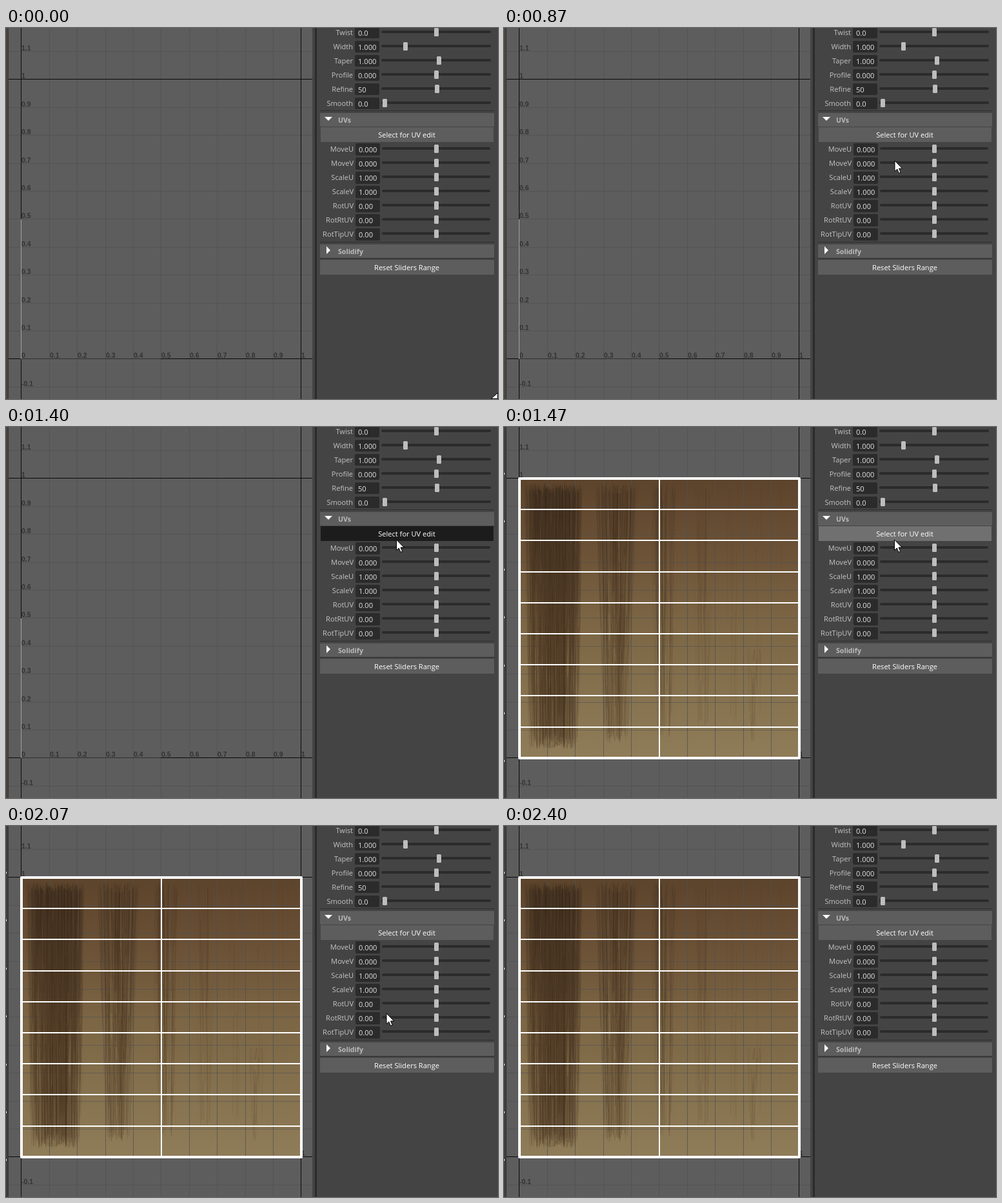
These frames come from a looping animation (763x576 px, 3190 ms). An HTML page with a canvas:

```html
<!DOCTYPE html>
<html lang="en">
<head>
<meta charset="utf-8">
<title>UV editor</title>
<style>
html, body { margin: 0; width: 100%; height: 100%; overflow: hidden; background: #444; }
canvas { display: block; }
</style>
</head>
<body>
<canvas id="stage" width="763" height="576"></canvas>
<script>
const W = 763, H = 576, LOOP = 3190, STEP = 200 / 3, UNIT = 43.4;
const FONT = '"Open Sans", "Noto Sans", sans-serif';
const PLAIN = '11.1px ' + FONT, BOLD = 'bold 10.6px ' + FONT;
const LABEL = 'bold 10.5px "Liberation Sans", Arial, sans-serif';
const ctx = document.getElementById('stage').getContext('2d');

function layer(draw) {
  const c = document.createElement('canvas');
  c.width = W;
  c.height = H;
  draw(c.getContext('2d'));
  return c;
}

function rect(g, x, y, w, h, color, r = 0) {
  g.fillStyle = color;
  g.beginPath();
  g.roundRect(x, y, w, h, r);
  g.fill();
}

function text(g, s, x, y, color, font, align = 'left') {
  g.font = font;
  g.textAlign = align;
  g.fillStyle = color;
  g.fillText(s, x, y);
}

// Filled SVG path placed at x, y, with an optional outline
function shape(g, d, x, y, fill, stroke) {
  const p = new Path2D(d);
  g.save();
  g.translate(x, y);
  g.fillStyle = fill;
  g.fill(p);
  if (stroke) {
    g.strokeStyle = stroke;
    g.stroke(p);
  }
  g.restore();
}

const lerp = (a, b, t) => a + (b - a) * t;
const gridX = i => Math.ceil(23 + i * UNIT - .01);
const gridY = i => Math.ceil(513 - i * UNIT - .01);

// UV view: grid, axes and labels
const view = layer(g => {
  rect(g, 0, 0, 482, H, '#444');
  rect(g, 4, 0, 471, H, '#5d5d5d');
  for (let i = -1; i <= 11; i++) {
    rect(g, 4, gridY(i), 471, 1, '#535353');
    if (i > 0 && i < 10) rect(g, gridX(i), 0, 1, H, '#535353');
  }
  for (const i of [0, 10]) {
    rect(g, gridX(i), 0, 1, H, '#0a0a0a');
    rect(g, 4, gridY(i), 471, 1, '#0a0a0a');
  }
  rect(g, 23, 513, 217, 1, '#303030');
  rect(g, 23, 297, 1, 217, '#a0a0a0');
  for (let i = -1; i <= 11; i++) {
    text(g, i / 10, 24, gridY(i) - 1, '#333', LABEL);
    if (i > 0 && i < 11) text(g, i / 10, gridX(i) + 1, 512, '#333', LABEL);
  }
  rect(g, 479, 0, 3, H, '#2b2b2b');
  rect(g, 0, 0, 3, H, '#4b443f');
  rect(g, 3, 0, 1, H, '#383838');
});

// Hair texture with the selected wireframe
const texture = layer(g => {
  let seed = 7;
  const rnd = () => (seed = seed * 16807 % 2147483647) / 2147483647;

  function shade(...colors) {
    const f = g.createLinearGradient(0, 80, 0, 514);
    colors.forEach((c, i) => f.addColorStop(i / (colors.length - 1), c));
    return f;
  }

  // Lock of hair centred on x, w wide at the top and w * taper at the bottom
  function lock(x, w, taper, y0, y1, count, alpha) {
    for (let i = 0; i < count; i++) {
      const u = rnd(), tone = rnd() * 36 - 14;
      const start = rnd() < .35 ? rnd() * .04 : rnd() * .8;
      const end = Math.min(start + .1 + rnd() * .6, 1 - rnd() * .05);
      const at = t => [x + (u - .5) * w * lerp(1, taper, t) + (rnd() - .5) * 3, lerp(y0, y1, t)];
      const rgb = (r, gr, b) => `rgb(${r + tone} ${gr + tone * .8} ${b + tone * .6})`;
      g.strokeStyle = shade(rgb(54, 39, 25), rgb(72, 52, 32), rgb(78, 58, 36));
      g.globalAlpha = alpha * Math.sqrt(Math.sin(Math.PI * u));
      g.lineWidth = .6 + rnd() * .7;
      g.beginPath();
      g.moveTo(...at(start));
      g.quadraticCurveTo(...at((start + end) / 2), ...at(end));
      g.stroke();
    }
    g.globalAlpha = 1;
  }

  rect(g, 24, 80, 434, 434, shade('#5c432b', '#6b5136', '#7b6544', '#85714e', '#8f7c58'));
  for (let i = 1; i < 10; i++) {
    rect(g, gridX(i), 80, 1, 434, 'rgba(78,80,84,.75)');
    rect(g, 24, gridY(i), 434, 1, 'rgba(78,80,84,.6)');
  }

  // Each lock is narrower, shorter and thinner than the one before
  for (let i = 0, x = 31, w = 92; i < 7; i++, x += w + 18, w *= .72) {
    lock(x + w / 2, w, i ? .55 : .85, 88, 500 - 9 * i, 760 * .38 ** i, .4 * .8 ** i);
  }
  lock(77, 80, .9, 92, 498, 420, .42);
  lock(389, 24, .6, 343, 490, 28, .2);

  g.strokeStyle = '#fff';
  g.lineWidth = 4;
  g.lineJoin = 'round';
  g.strokeRect(24, 80, 434, 434);
  for (let i = 1; i < 9; i++) rect(g, 24, Math.round(79 + i * 48.2), 434, 2, '#fff');
  rect(g, 240, 80, 2, 434, '#fff');

  rect(g, 0, 0, 3, H, '#3e3e3e');
  for (let i = 0; i < 7; i++) rect(g, 0, Math.round(71 + i * 74.4), 1, 3, '#eee');
});

// Settings panel
const panel = layer(g => {
  rect(g, 482, 0, 281, H, '#444');

  // Rows are written "name value knob"; the knob is centred when left out
  function sliders(rows, top, dx) {
    rows.split(', ').forEach((row, i) => {
      const [name, value, knob = 667.5] = row.split(' '), y = top + 22 * i;
      text(g, name, 538 + dx, y + 4.5, '#c4c4c4', PLAIN, 'right');
      rect(g, 541 + dx, y - 8.5, 38, 18 + dx, '#2b2b2b', 2);
      text(g, value, 546 + dx, y + 5.5, '#e4e4e4', PLAIN);
      rect(g, 582 + dx, y - 2.5, 170 - 2 * dx, 4, '#2b2b2b', 2);
      rect(g, knob - 3.5, y - 6.5, 7, 13, '#bdbdbd', 1.5);
    });
  }
  sliders('Twist 0.0, Width 1.000 619.5, Taper 1.000 671.5, Profile 0.000, Refine 50 668.5, Smooth 0.0 587.5', 6.5, 0);
  sliders('MoveU 0.000, MoveV 0.000, ScaleU 1.000, ScaleV 1.000, RotUV 0.00, RotRtUV 0.00, RotTipUV 0.00', 187.5, 1);

  for (const y of [128, 332, 357]) rect(g, 487, y, 270, 1, '#2e2e2e');
  for (const [name, y] of [['UVs', 132], ['Solidify', 336]]) {
    rect(g, 487, y, 270, 21, '#5d5d5d', 1);
    text(g, name, 515, y + 15, '#bbb', BOLD);
  }
  shape(g, 'M0 0h12l-6 6z', 494, 138, '#fff');
  shape(g, 'M0 0l6 6l-6 6z', 497, 339, '#fff');
  rect(g, 487, 360, 270, 23, '#5d5d5d', 1);
  text(g, 'Reset Sliders Range', 621.5, 376, '#fff', PLAIN, 'center');
});

const ARROW = 'M0 0V16.5L3.8 13L6.5 19.3L9.2 18.2L6.5 12H11.7Z';
const SPLIT = 'M-11 0l5-4v2.5h12v-2.5l5 4l-5 4v-2.5h-12v2.5z';
const CORNER = 'M0 0v9h-10z';

const A = [758, 570], B = [607.5, 299.5], C = [605.5, 175], D = [481.5, 551.5];
const easeIn = p => t => t ** p;
const easeOut = t => 1 - (1 - t) ** 2;

// Pointer tip at a step: up from the corner, onto the button, away to the divider
function pointer(k) {
  const move = (k0, k1, a, b, easeX, easeY) => {
    const t = Math.max(0, (k - k0) / (k1 - k0));
    return [lerp(a[0], b[0], easeX(t)), lerp(a[1], b[1], easeY(t))];
  };
  if (k <= 10) return move(2, 10, A, B, easeOut, easeIn(2));
  if (k <= 16) return move(10, 16, B, C, easeOut, easeOut);
  return move(27, 35, C, D, easeIn(3), easeIn(1.7));
}

function frame(now) {
  const k = Math.floor((now % LOOP + 3.4) / STEP);
  const [x, y] = pointer(k);
  ctx.drawImage(view, 0, 0);
  if (k >= 22) ctx.drawImage(texture, 0, 0);
  ctx.drawImage(panel, 0, 0);

  const hover = y > 154 && y < 178;
  rect(ctx, 488, 154, 268, 23, k === 21 ? '#1c1c1c' : hover ? '#707070' : '#5d5d5d');
  text(ctx, 'Select for UV edit', 621.5, 170, '#fff', PLAIN, 'center');

  if (k <= 2) shape(ctx, CORNER, 762.5, 566.5, '#fff', '#000');
  else if (k < 35) shape(ctx, ARROW, x, y, '#fff', '#000');
  else if (k === 35) shape(ctx, SPLIT, x, y, '#fff', '#000');
  requestAnimationFrame(frame);
}
requestAnimationFrame(frame);
</script>
</body>
</html>
```
